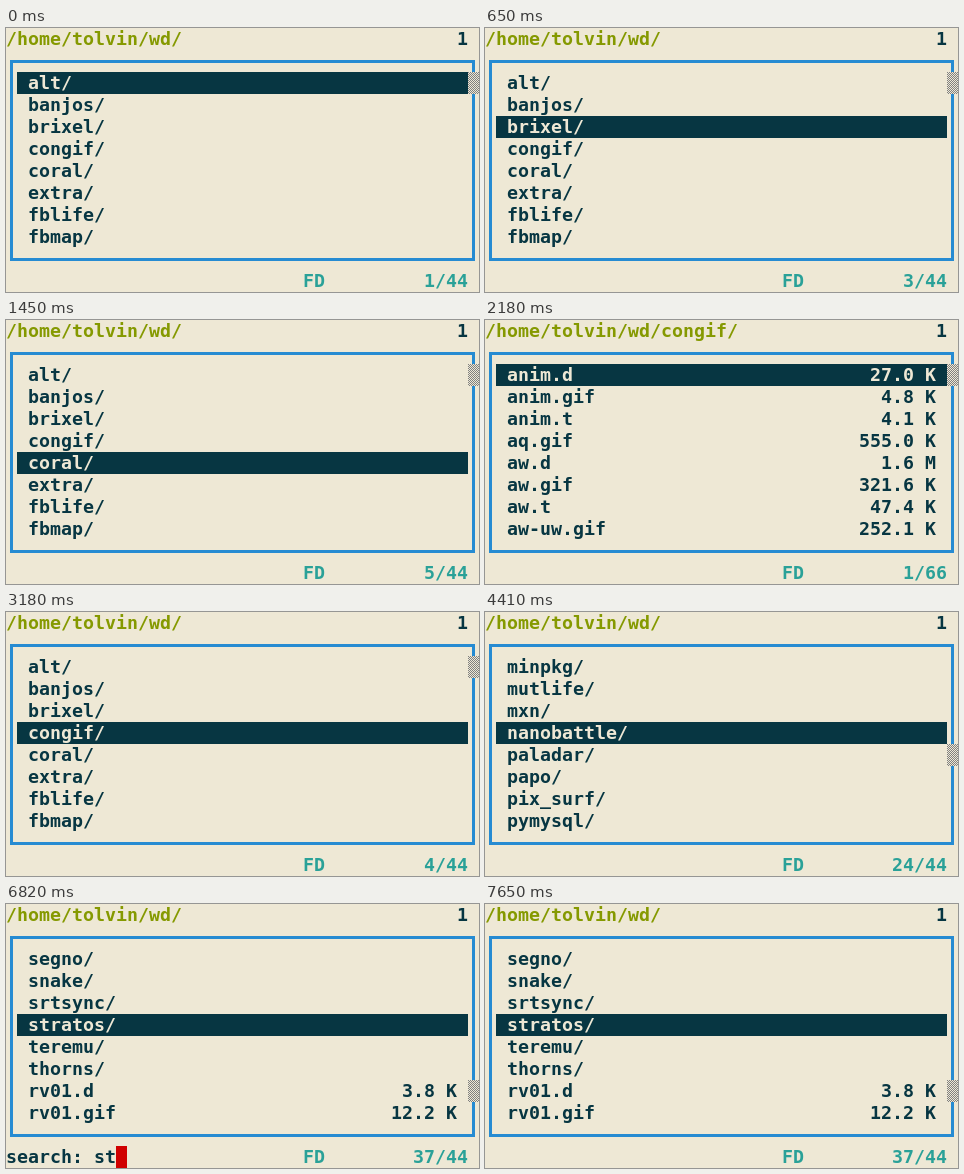
Write an HTML page with a canvas that moves like this. It is 473x264 px and loops after 8000 ms.

```html
<!DOCTYPE html>
<html lang="en">
<head>
<meta charset="utf-8">
<title>File manager</title>
<style>
html, body { margin: 0; width: 100%; height: 100%; overflow: hidden; background: #eee8d5; }
canvas { display: block; }
</style>
</head>
<body>
<canvas id="term" width="473" height="264"></canvas>
<script>
const CW = 11, CH = 22, ROWS = 8, LOOP = 8000;
const BG = '#eee8d5', FG = '#073642', BLUE = '#268bd2', GREEN = '#859900',
      CYAN = '#2aa198', RED = '#d00000', GREY = '#808080';
const ctx = document.getElementById('term').getContext('2d');

const home = {
  path: '/home/tolvin/wd/',
  total: 44,
  items: ('alt/ banjos/ brixel/ congif/ coral/ extra/ fblife/ fbmap/ ' +
    'fontas/ gridlet/ hexlog/ inkpot/ jotter/ kiosk/ lantern/ lexa/ ' +
    'mapgen/ maze/ menuq/ midnote/ minpkg/ mutlife/ mxn/ nanobattle/ ' +
    'paladar/ papo/ pix_surf/ pymysql/ quarry/ randtext/ relay/ ropes/ ' +
    'rvtool/ segno/ snake/ srtsync/ stratos/ teremu/ thorns/ ' +
    'rv01.d=3.8_K rv01.gif=12.2_K').split(' ')
};
const sub = {
  path: '/home/tolvin/wd/congif/',
  total: 66,
  items: ('anim.d=27.0_K anim.gif=4.8_K anim.t=4.1_K aq.gif=555.0_K ' +
    'aw.d=1.6_M aw.gif=321.6_K aw.t=47.4_K aw-uw.gif=252.1_K').split(' ')
};

// [start time, directory, first visible item, selected item, search input]
const steps = [
  [0, home, 1, 1], [490, home, 1, 2], [650, home, 1, 3], [780, home, 1, 4],
  [920, home, 1, 5], [1060, home, 1, 6], [1450, home, 1, 5], [1610, home, 1, 4],
  [2180, sub, 1, 1], [3180, home, 1, 4],
  [4090, home, 11, 14], [4410, home, 21, 24], [4720, home, 31, 34], [5040, home, 21, 24],
  [6040, home, 21, 24, ''], [6540, home, 31, 34, 's'],
  [6820, home, 34, 37, 'st'], [6890, home, 34, 37, 'str'], [7650, home, 34, 37]
];

function box(color, x, y, w, h) {
  ctx.fillStyle = color;
  ctx.fillRect(x, y, w, h);
}

function text(str, col, row, color) {
  ctx.fillStyle = color;
  [...str].forEach((ch, i) => ctx.fillText(ch, (col + i) * CW, row * CH + 17));
}

function textRight(str, end, row, color) {
  text(str, end - str.length, row, color);
}

function scrollbar(row) {
  const x = 42 * CW, y = row * CH;
  box(BG, x, y, CW, CH);
  for (let i = 0; i < CW; i++)
    for (let j = i % 2; j < CH; j += 2) box(GREY, x + i, y + j, 1, 1);
}

function draw([, dir, top, sel, query]) {
  box(BG, 0, 0, 473, 264);
  ctx.font = 'bold 18.27px "DejaVu Sans Mono", monospace';
  text(dir.path, 0, 0, GREEN);
  text('1', 41, 0, FG);

  ctx.strokeStyle = BLUE;
  ctx.lineWidth = 3;
  ctx.strokeRect(5.5, 33.5, 462, 198);

  for (let i = 0; i < ROWS; i++) {
    const [name, size = ''] = dir.items[top - 1 + i].split('=');
    const row = i + 2, active = top + i === sel;
    if (active) box(FG, CW, row * CH, 41 * CW, CH);
    const color = active ? BG : FG;
    text(name, 2, row, color);
    // sizes keep a blank between number and unit
    textRight(size.replace('_', ' '), 41, row, color);
  }
  scrollbar(2 + Math.floor((sel - 1) * ROWS / dir.total));

  if (query !== undefined) {
    const prompt = 'search: ' + query;
    text(prompt, 0, 11, FG);
    box(RED, prompt.length * CW, 11 * CH, CW, CH);
  }
  text('FD', 27, 11, CYAN);
  textRight(sel + '/' + dir.total, 42, 11, CYAN);
}

const start = performance.now();
function frame() {
  const t = (performance.now() - start) % LOOP;
  draw(steps.findLast(s => s[0] <= t));
  requestAnimationFrame(frame);
}
frame();
</script>
</body>
</html>
```
